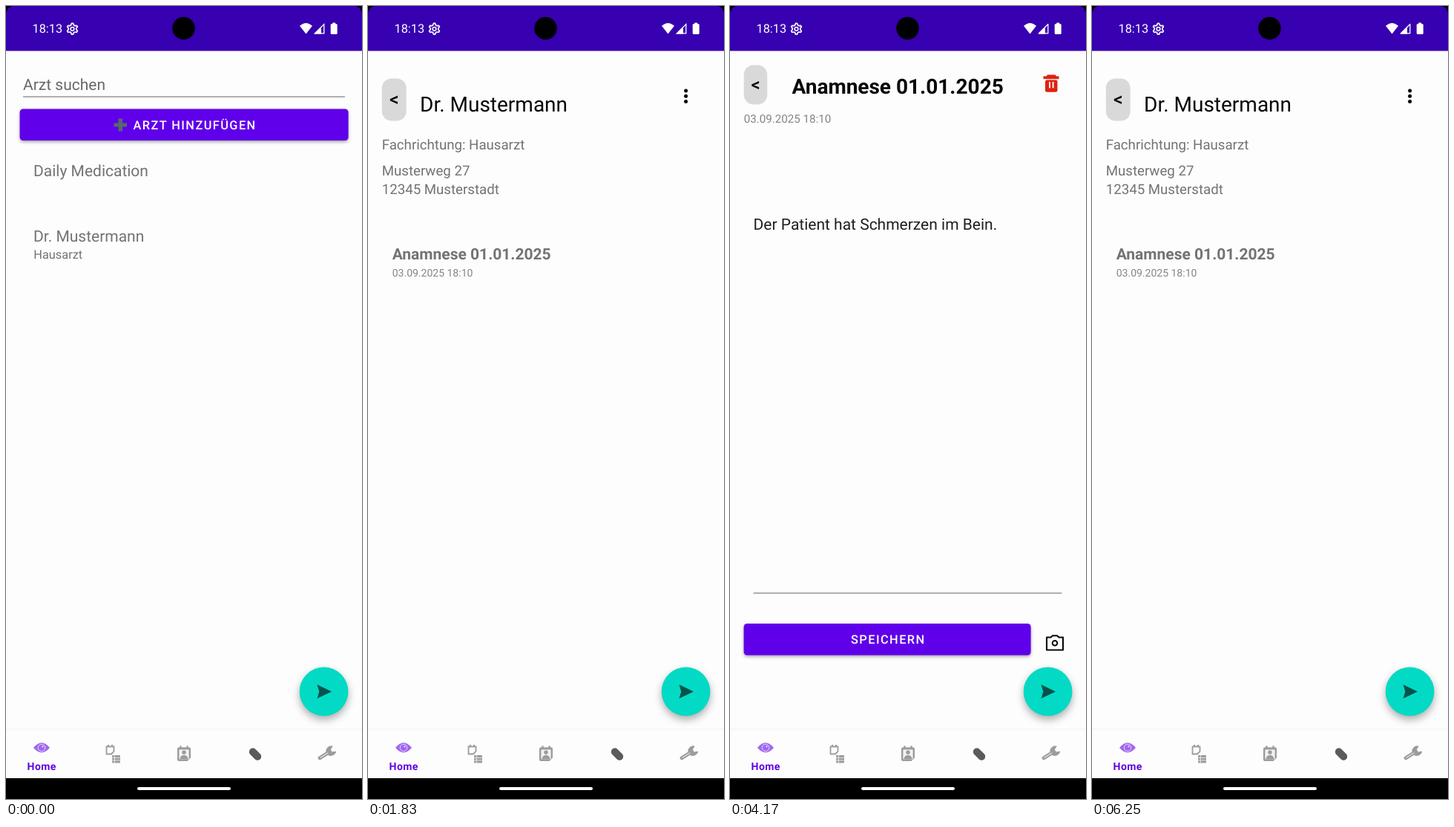
An HTML page with a canvas for the animation above (7.66 s loop, 480x1067 px).

```html
<!DOCTYPE html>
<html lang="de">
<head>
<meta charset="utf-8">
<style>
  html, body { margin: 0; width: 100%; height: 100%; overflow: hidden; background: #000; }
  canvas { display: block; width: 480px; height: 1067px; }
</style>
</head>
<body>
<canvas id="stage"></canvas>
<script>
const W = 480, H = 1067, LOOP = 7660;
const canvas = document.getElementById('stage');
const ctx = canvas.getContext('2d');
const ratio = window.devicePixelRatio || 1;
canvas.width = Math.round(W * ratio);
canvas.height = Math.round(H * ratio);

const C = {
  bar: '#3700b0', button: '#6000ea', teal: '#03dac5', text: '#737373', pale: '#858585',
  ink: '#080808', icon: '#9c9c9c', chip: '#d9d9da', light: '#fff', page: '#fdfdfd', rule: '#7c7c7e'
};
const T = { detail: 1250, note: 3580, keys: 4830, hide: 5920, back: 6000, end: 6250 };

const clamp = v => Math.max(0, Math.min(1, v));
const ease = v => 1 - (1 - clamp(v)) ** 3;

function text(str, x, y, size, color, { weight = 400, gap = 0, align = 'left' } = {}) {
  ctx.font = `${weight} ${size}px Roboto, sans-serif`;
  ctx.textRendering = 'geometricPrecision';
  ctx.letterSpacing = gap + 'px';
  ctx.textAlign = align;
  ctx.fillStyle = color;
  ctx.fillText(str, x, y);
}

function box(x, y, w, h, r, color) {
  ctx.fillStyle = color;
  ctx.beginPath();
  ctx.roundRect(x, y, w, h, r);
  ctx.fill();
}

function disc(x, y, r, color) {
  ctx.fillStyle = color;
  ctx.beginPath();
  ctx.arc(x, y, r, 0, Math.PI * 2);
  ctx.fill();
}

function ring(x, y, r, color, width) {
  ctx.strokeStyle = color;
  ctx.lineWidth = width;
  ctx.beginPath();
  ctx.arc(x, y, r, 0, Math.PI * 2);
  ctx.stroke();
}

function fill(d, color) {
  ctx.fillStyle = color;
  ctx.fill(new Path2D(d));
}

function line(d, color, width) {
  ctx.strokeStyle = color;
  ctx.lineWidth = width;
  ctx.stroke(new Path2D(d));
}

function shadowed(color, blur, dy, draw) {
  ctx.save();
  ctx.shadowColor = color;
  ctx.shadowBlur = blur * ratio;
  ctx.shadowOffsetY = dy * ratio;
  draw();
  ctx.restore();
}

function gear(x, y) {
  ctx.beginPath();
  for (let i = 0; i < 24; i++) {
    const a = (i - 0.5) * Math.PI / 12;
    const r = i % 4 < 2 ? 7.4 : 5.3;
    ctx.lineTo(x + r * Math.sin(a), y - r * Math.cos(a));
  }
  ctx.closePath();
  ctx.strokeStyle = C.light;
  ctx.lineWidth = 1.7;
  ctx.stroke();
  ring(x, y, 2.4, C.light, 1.5);
}

function statusBar() {
  ctx.fillStyle = C.bar;
  ctx.fillRect(0, 0, W, 60.44);
  fill('M0 0H9Q2 1 0 9ZM480 0V9Q478 1 471 0Z', '#000');
  text('18:13', 35.5, 36.3, 16.33, C.light);
  gear(89.5, 30.8);
  disc(239.5, 30, 15.3, '#000');
  fill('M404.5 37.5L396 26.8Q404.5 19.2 413 26.8Z', C.light);
  line('M416.5 36.8H428.8V24.5Z', C.light, 1.3);
  fill('M415.3 37.4L425 27.7V37.4Z', C.light);
  box(437.7, 24, 9, 14, 1.6, C.light);
  box(440.2, 22.4, 4, 2.5, 0.5, C.light);
}

function wrench() {
  ctx.save();
  ctx.translate(432, 1006.2);
  ctx.rotate(-0.56);
  ctx.lineCap = 'round';
  line('M-10.5 0H3', C.icon, 5);
  fill('M13 -4.2L8 -1.8V1.8L13 4.2A7 6.2 0 0 1 1 2.8V-2.8A7 6.2 0 0 1 13 -4.2Z', C.icon);
  line('M-9.5 0H2', '#e2e2e2', 1.2);
  ctx.restore();
}

function navBar() {
  ctx.fillStyle = '#f1f1f1';
  ctx.fillRect(0, 972.5, W, 1);

  fill('M37 998Q48 984.5 59 998Q48 1011 37 998Z', '#a067ee');
  ring(48, 998, 4.8, '#efe4fc', 0.9);
  disc(49.5, 996.4, 1.1, '#efe4fc');
  text('Home', 48.2, 1027.5, 14, '#6000e6', { weight: 700, gap: 0.45, align: 'center' });

  line('M135.5 996.5H145.5V1003L142 1006.5H135.5Z', C.icon, 1.8);
  line('M138 994V996M143 994V996', C.icon, 2);
  box(143, 1008, 11, 10.5, 1, C.icon);
  line('M143 1011.6H154M143 1015H154M146.4 1008V1018.5', '#ededed', 0.9);

  box(231, 997.5, 18, 18.5, 2, C.icon);
  line('M235.5 995.5V999M244.5 995.5V999', C.icon, 2.4);
  box(233.4, 1000.5, 13.2, 13, 1, '#f2f2f2');
  disc(240, 1004.2, 2.7, C.icon);
  fill('M234.5 1013.5Q235 1008 240 1008Q245 1008 245.5 1013.5Z', C.icon);
  fill('M249.5 1011V1016.5H244Z', C.page);

  ctx.save();
  ctx.translate(336, 1006.7);
  ctx.rotate(Math.PI / 4);
  box(-9.5, -5, 19, 10, 5, '#5b5b5b');
  ctx.restore();

  wrench();
  ctx.fillStyle = '#000';
  ctx.fillRect(0, 1039, W, 28);
  box(177, 1051, 126, 4, 2, C.light);
}

function fab() {
  shadowed('rgba(0,0,0,.32)', 11, 5, () => disc(428.6, 922.4, 32.9, C.teal));
  fill('M419.5 913L439 922.4L419.5 931.8L422.3 922.4Z', '#07534b');
}

function button(x, y, w, h) {
  shadowed('rgba(0,0,0,.35)', 4, 2, () => box(x, y, w, h, 4.5, C.button));
}

function chip(x, y, w, h, size) {
  box(x, y, w, h, 13, C.chip);
  text('<', x + w / 2 + 0.2, y + h / 2 + size * 0.33, size, C.ink, { weight: 500, align: 'center' });
}

function home() {
  text('Arzt suchen', 23, 113, 21, '#686868');
  ctx.fillStyle = C.rule;
  ctx.fillRect(23, 121.5, 434, 1.2);
  button(18.6, 138.5, 443, 42.5);
  fill('M151.6 151.5H157V157.4H163V162.6H157V168.6H151.6V162.6H145.5V157.4H151.6Z', '#54696c');
  text('ARZT HINZUFÜGEN', 171.5, 165.8, 16.33, C.light, { weight: 500, gap: 1.457 });
  text('Daily Medication', 37, 229, 21, C.text);
  text('Dr. Mustermann', 37, 317, 21, C.text);
  text('Hausarzt', 37.3, 340.3, 16.33, C.text);
}

function detail() {
  chip(18.7, 97.5, 33, 57, 25);
  text('Dr. Mustermann', 70, 142, 28, C.ink);
  for (const y of [114, 121.2, 128.4]) disc(428.6, y, 2.5, C.ink);
  text('Fachrichtung: Hausarzt', 18.7, 193, 18.67, C.text);
  text('Musterweg 27', 18.7, 228, 18.67, C.text);
  text('12345 Musterstadt', 18.7, 253.3, 18.67, C.text);
  text('Anamnese 01.01.2025', 32.7, 341.3, 21, C.text, { weight: 700 });
  text('03.09.2025 18:10', 32.7, 364.2, 14, C.pale);
}

function trash() {
  const red = '#de2210';
  fill('M428 92.5H438.5L440 94.5H443.5V98.3H422.5V94.5H426.5Z', red);
  box(425, 99.5, 16.5, 16.3, 2.4, red);
  ctx.fillStyle = '#fff0ee';
  ctx.fillRect(430, 102, 2, 8.5);
  ctx.fillRect(434.6, 102, 2, 8.5);
}

function note(focused) {
  chip(18.7, 79.5, 31.5, 53, 24);
  text('Anamnese 01.01.2025', 83.5, 118.3, 28, C.ink, { weight: 700 });
  trash();
  text('03.09.2025 18:10', 18.7, 157, 15.17, C.pale);
  text('Der Patient hat Schmerzen im Bein.', 31.5, 301.2, 21, '#1f1f1f');
  ctx.fillStyle = focused ? C.teal : C.rule;
  ctx.fillRect(31.5, focused ? 789 : 789.4, 416, focused ? 2.2 : 1.2);
  button(18.6, 831, 387, 42.5);
  text('SPEICHERN', 163, 858.3, 16.33, C.light, { weight: 500, gap: 1.457 });
  ctx.lineJoin = 'round';
  line('M427 849.5H432.5L435 847.2H441L443.5 849.5H449V866.5H427Z', C.ink, 2.1);
  ring(438, 857.3, 3.3, C.ink, 2);
  if (focused) {
    ctx.fillStyle = C.teal;
    ctx.fillRect(358.2, 278.5, 2.3, 28.5);
    fill('M358.5 307L366.7 315.2A11.6 11.6 0 1 1 350.3 315.2Z', C.teal);
  }
}

function keyPanel(show) {
  if (show <= 0) return;
  ctx.save();
  ctx.globalAlpha = show;
  const panel = () => box(9, 400, 66.5, 307, 33, '#f7f5fd');
  shadowed('rgba(0,0,0,.13)', 80, 14, panel);
  shadowed('rgba(0,0,0,.2)', 22, 7, panel);

  box(38.8, 421, 7, 14.5, 3.5, C.ink);
  line('M35.5 431.5A6.8 6.8 0 0 0 49 431.5M42.3 438V443', C.ink, 2.1);

  line('M35.5 482H55.5V503.5H35.5L28 492.8Z', C.ink, 2.3);
  line('M39.5 488L49 497.5M49 488L39.5 497.5', C.ink, 2.3);

  disc(42.2, 553.5, 26, '#d8e1fb');
  line('M54.5 546.5V553.5H31M37.5 546.5L30.8 553.5L37.5 560.2', '#33455c', 2.3);

  ring(42.3, 614.2, 10.8, C.ink, 2.2);
  disc(38.4, 611, 1.8, C.ink);
  disc(46.2, 611, 1.8, C.ink);
  fill('M36 616H48.6Q46.8 621.3 42.3 621.3Q37.8 621.3 36 616Z', C.ink);

  line('M32 668.5H53M32 674.8H53M32 681H53', C.ink, 2.2);
  ctx.restore();
}

function draw(t) {
  ctx.setTransform(ratio, 0, 0, ratio, 0, 0);
  ctx.fillStyle = C.page;
  ctx.fillRect(0, 0, W, H);

  if (t < T.detail) home();
  else if (t < T.note || t >= T.back) detail();
  else note(t >= T.keys);

  if (t >= T.keys) {
    const shown = ease((t - T.keys + 80) / 240);
    keyPanel(shown * clamp((T.end - t) / (T.end - T.hide)));
  }
  fab();
  statusBar();
  navBar();
}

const start = performance.now();
function tick() {
  draw((performance.now() - start) % LOOP);
  requestAnimationFrame(tick);
}
tick();
</script>
</body>
</html>
```
